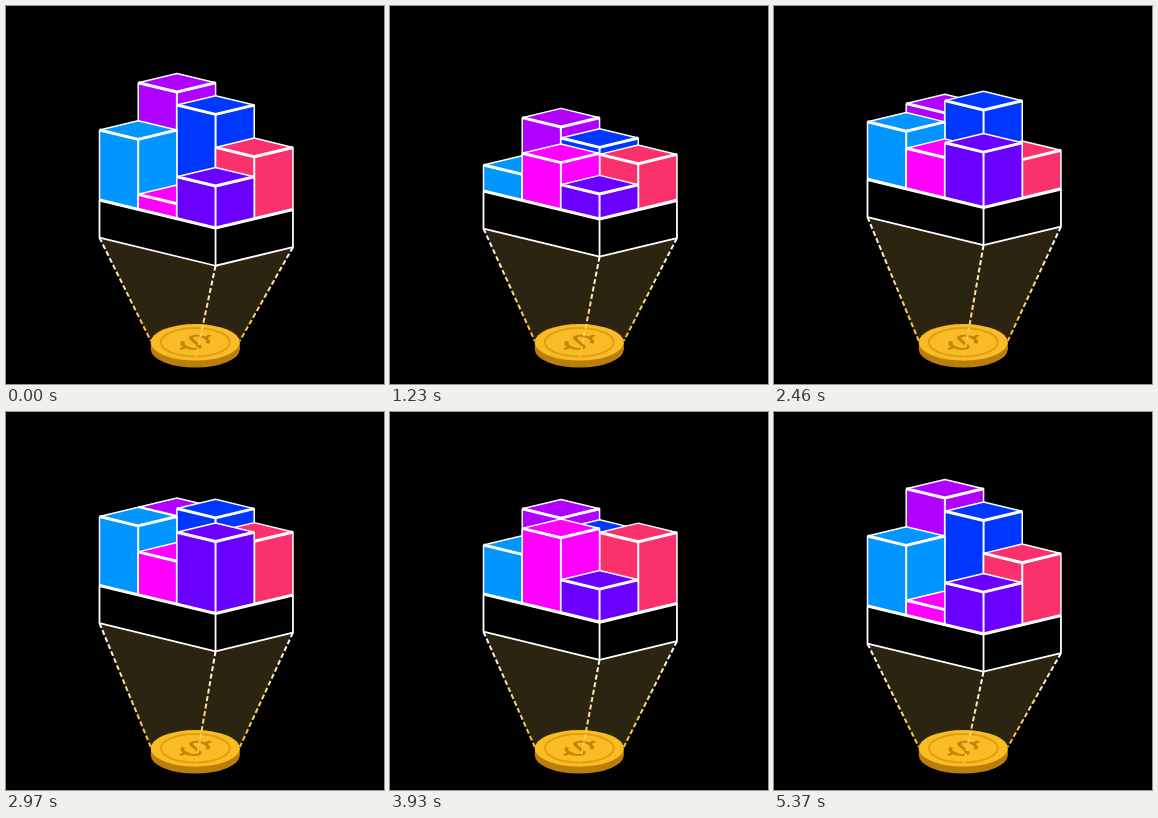
An HTML page with a canvas for the animation above (5400 ms loop, 378x378 px).

```html
<!DOCTYPE html>
<html lang="en">
<head>
<meta charset="utf-8">
<title>Blocks over a coin</title>
<style>
  html, body { margin: 0; width: 100%; height: 100%; overflow: hidden; background: #000; }
  canvas { display: block; width: 100vw; height: 100vh; }
</style>
</head>
<body>
<canvas id="stage" width="378" height="378"></canvas>
<script>
const ctx = document.getElementById('stage').getContext('2d');
const LOOP = 5400, STEP = 30, DEPTH = 37.7, COLUMNS = 3;
const GOLD = '#f9bc25';
const COIN = { x: 189.3, y: 336.3, rx: 44.5, ry: 18.3, thick: 7 };

// Bars from back to front, row by row; each has one height per beat.
const beats = [0, 1230, 1980, 2970, 3930, 4710];
const bars = [
  { color: '#b000ff', heights: [108, 64, 65, 69, 76, 98] },
  { color: '#0037ff', heights: [95, 53, 75, 77, 65, 58] },
  { color: '#fb316c', heights: [62, 46, 22, 63, 71, 70] },
  { color: '#0095ff', heights: [70, 26, 42, 69, 49, 63] },
  { color: '#ff00ff', heights: [15, 47, 43, 43, 75, 42] },
  { color: '#6a00ff', heights: [42, 25, 34, 72, 33, 33] }
];

// Smooth periodic curve through the beats, at rest where the loop closes.
function heightAt(heights, t) {
  const n = beats.length;
  const time = i => beats[(i + n) % n] + Math.floor(i / n) * LOOP;
  const value = i => heights[(i + n) % n];
  const rate = i => (value(i + 1) - value(i)) / (time(i + 1) - time(i));
  const slope = i => {
    if (i % n === 0) return 0;
    const before = time(i) - time(i - 1), after = time(i + 1) - time(i);
    return (rate(i - 1) * after + rate(i) * before) / (before + after);
  };
  const i = beats.findLastIndex(b => b <= t);
  const d = time(i + 1) - time(i), s = (t - time(i)) / d, r = 1 - s;
  return value(i) * (1 + 2 * s) * r * r + value(i + 1) * s * s * (3 - 2 * s)
    + d * (slope(i) * s * r * r - slope(i + 1) * s * s * r);
}

function trace(points) {
  ctx.beginPath();
  points.forEach(p => ctx.lineTo(p[0], p[1]));
}

function fill(points, color) {
  trace(points);
  ctx.fillStyle = color;
  ctx.fill();
}

function line(points, width, color = '#fff') {
  trace(points);
  ctx.lineWidth = width;
  ctx.strokeStyle = color;
  ctx.stroke();
}

function coinPath(drop, scale) {
  ctx.beginPath();
  ctx.ellipse(COIN.x, COIN.y + drop, COIN.rx * scale, COIN.ry * scale, 0, 0, Math.PI * 2);
}

function drawCoin() {
  ctx.fillStyle = '#b97f0a';
  coinPath(COIN.thick, 1);
  ctx.fill();
  ctx.fillRect(COIN.x - COIN.rx, COIN.y, COIN.rx * 2, COIN.thick);
  ctx.fillStyle = GOLD;
  coinPath(0, 1);
  ctx.fill();
  ctx.strokeStyle = '#e09f13';
  ctx.lineWidth = 2;
  coinPath(0, 0.775);
  ctx.stroke();

  // Dollar sign lying flat: one half, then the same half turned around.
  ctx.strokeStyle = '#c1850c';
  ctx.lineWidth = 4;
  for (const side of [1, -1]) {
    ctx.save();
    ctx.transform(0.707 * side, 0.33 * side, -0.707 * side, 0.33 * side, COIN.x, COIN.y);
    ctx.beginPath();
    ctx.moveTo(9.5, -7);
    ctx.bezierCurveTo(8, -16, -11, -16, -11, -7);
    ctx.bezierCurveTo(-11, -2, -5, -1.5, 0, 0);
    ctx.moveTo(0, -13);
    ctx.lineTo(0, -21.5);
    ctx.stroke();
    ctx.restore();
  }
}

function drawRay(from, to) {
  const shade = ctx.createLinearGradient(...from, ...to);
  shade.addColorStop(0, '#fff');
  shade.addColorStop(1, GOLD);
  ctx.setLineDash([5, 2.6]);
  line([from, to], 2, shade);
  ctx.setLineDash([]);
}

function draw(t) {
  const lift = 10.5 * (1 - Math.cos(t / LOOP * Math.PI * 2));
  const at = (u, v, h) => [93.5 + 38.68 * u + 38.7 * v, 194 + 9.35 * u - 9.3 * v - lift - h];

  ctx.fillStyle = '#000';
  ctx.fillRect(0, 0, 378, 378);
  ctx.lineJoin = 'round';

  const left = at(0, 0, -DEPTH), front = at(COLUMNS, 0, -DEPTH), right = at(COLUMNS, 2, -DEPTH);
  const topLeft = at(0, 0, 0), topFront = at(COLUMNS, 0, 0), topRight = at(COLUMNS, 2, 0);
  const coinLeft = [COIN.x - COIN.rx, 335], coinRight = [COIN.x + COIN.rx, 335];
  fill([left, front, right, coinRight, coinLeft], '#2b2411');
  drawCoin();
  drawRay(left, coinLeft);
  drawRay(front, [COIN.x, COIN.y + COIN.ry]);
  drawRay(right, coinRight);

  fill([topLeft, topFront, topRight, right, front, left], '#000');

  bars.forEach(({ color, heights }, i) => {
    const u = i % COLUMNS, v = i < COLUMNS ? 1 : 0;
    const h = heightAt(heights, t);
    const w = at(u, v, h), s = at(u + 1, v, h), e = at(u + 1, v + 1, h), n = at(u, v + 1, h);
    const base = [at(u + 1, v + 1, 0), at(u + 1, v, 0), at(u, v, 0)];
    const outline = [w, n, e, ...base, w];
    fill(outline, color);
    line(outline, 1.5);
    line([s, base[1]], 2);
    line([w, s, e], 3);
  });

  line([topLeft, topFront, topRight], 3.2);
  line([topLeft, left, front, right, topRight], 1.8);
  line([topFront, front], 1.8);
}

const start = performance.now();
function frame() {
  const t = (performance.now() - start) % LOOP;
  draw(Math.floor(t / STEP) * STEP);
  requestAnimationFrame(frame);
}
frame();
</script>
</body>
</html>
```
